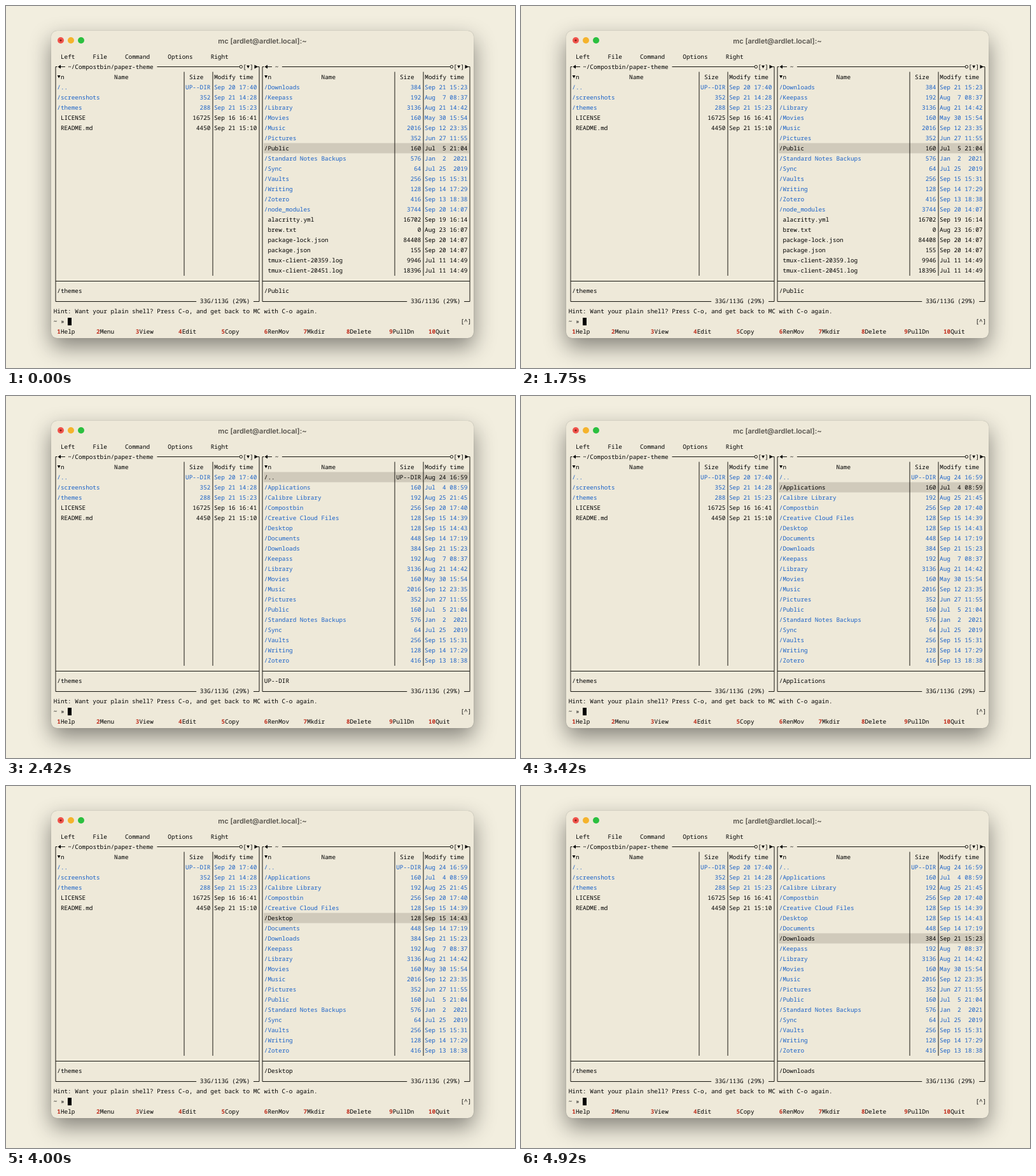
Animation of 800 by 569 pixels, one loop 5010 ms. Source, as an HTML page:

```html
<!DOCTYPE html>
<html lang="en">
<head>
<meta charset="utf-8">
<title>File manager</title>
<style>
html, body { margin: 0; width: 100%; height: 100%; overflow: hidden; background: #f2eedf; }
.window {
  position: absolute; left: 70.5px; top: 39px; width: 664.5px; height: 482.5px;
  border-radius: 9px; background: #eee9d9;
  box-shadow: 0 0 1px rgba(0,0,0,.35), 0 14px 34px rgba(0,0,0,.45);
}
svg { position: absolute; left: 0; top: 0; display: block; }
text { white-space: pre; text-rendering: geometricPrecision; }
.term { font: 9.353px "Noto Sans Mono", monospace; fill: #000; }
.term .dir { fill: #1a62c8; }
.term .key { fill: #c0301f; font-weight: 700; }
.title { font: 600 11px Inter, sans-serif; fill: #57544d; text-anchor: middle; }
.rules { fill: none; stroke: #16150f; }
</style>
</head>
<body>
<div class="window"></div>
<svg id="stage" width="800" height="569" viewBox="0 0 800 569">
  <circle cx="86" cy="54" r="5" fill="#f0544c"/>
  <circle cx="86" cy="54" r="1.6" fill="#8a1a12"/>
  <circle cx="102" cy="54" r="5" fill="#f5b32c"/>
  <circle cx="118" cy="54" r="5" fill="#2bc03f"/>
  <text class="title" x="403" y="58.5">mc [ardlet@ardlet.local]:~</text>
  <rect id="bar" x="405" width="323" height="16" fill="#d0cabb"/>
  <rect x="97" y="490" width="6" height="12"/>
  <g id="rules" class="rules"></g>
  <g id="marks"></g>
  <g id="term" class="term"></g>
</svg>
<script>
const LOOP = 5010, CELL = 5.612, LEFT = 74.7, LINE = 16, VISIBLE = 19, FIRST = 3;
const $ = id => document.getElementById(id);
const colX = col => LEFT + col * CELL;

function add(parent, tag, attrs, content = '') {
  const el = document.createElementNS('http://www.w3.org/2000/svg', tag);
  for (const key in attrs) el.setAttribute(key, attrs[key]);
  el.textContent = content;
  return parent.appendChild(el);
}

const put = (col, row, str = '', cls = '') =>
  add($('term'), 'text', { x: colX(col), y: 83 + row * LINE, class: cls }, str);

const parse = list => list.trim().split('\n').map(line => {
  const [name, size, date] = line.split('|');
  return { name, size, date, dir: name[0] === '/' };
});

const format = (f, width) =>
  (f.dir ? f.name : ' ' + f.name).padEnd(width) + ' ' + f.size.padStart(7) + ' ' + f.date;

const project = parse(`
/..|UP--DIR|Sep 20 17:40
/screenshots|352|Sep 21 14:28
/themes|288|Sep 21 15:23
LICENSE|16725|Sep 16 16:41
README.md|4450|Sep 21 15:10`);

const home = parse(`
/..|UP--DIR|Aug 24 16:59
/Applications|160|Jul  4 08:59
/Calibre Library|192|Aug 25 21:45
/Compostbin|256|Sep 20 17:40
/Creative Cloud Files|128|Sep 15 14:39
/Desktop|128|Sep 15 14:43
/Documents|448|Sep 14 17:19
/Downloads|384|Sep 21 15:23
/Keepass|192|Aug  7 08:37
/Library|3136|Aug 21 14:42
/Movies|160|May 30 15:54
/Music|2016|Sep 12 23:35
/Pictures|352|Jun 27 11:55
/Public|160|Jul  5 21:04
/Standard Notes Backups|576|Jan  2  2021
/Sync|64|Jul 25  2019
/Vaults|256|Sep 15 15:31
/Writing|128|Sep 14 17:29
/Zotero|416|Sep 13 18:38
/node_modules|3744|Sep 20 14:07
alacritty.yml|16702|Sep 19 16:14
brew.txt|0|Aug 23 16:07
package-lock.json|84408|Sep 20 14:07
package.json|155|Sep 20 14:07
tmux-client-20359.log|9946|Jul 11 14:49
tmux-client-20451.log|18396|Jul 11 14:49`);

// One panel frame: c0 and c1 are the border columns, d1 and d2 the dividers.
function panel(c0, c1, d1, d2, path) {
  const mid = col => Math.round(colX(col) + CELL / 2 + .3);
  const l = mid(c0), r = mid(c1), ring = colX(c1 - 5) + CELL / 2;
  const tri = (x, y) => `M${x - 2.4} ${y - 2}h4.8l-2.4 4.6z`;
  add($('rules'), 'path', { d:
    `M${l + 2.5} 95.5H${l}V464.5H${colX(c1 - 17)}` +
    `M${colX(c1 - 1)} 464.5H${r}V95.5h-3` +
    `M${l + 5} 95.5h10M${colX(c0 + 5 + path.length)} 95.5H${ring - 2.3}` +
    `M${l} 432.5H${r}M${mid(d1)} 103.5V424M${mid(d2)} 103.5V424` });
  add($('rules'), 'circle', { cx: ring, cy: 95.5, r: 2.2 });
  add($('marks'), 'path', { d:
    `M${l + 3.5} 95.5l4.5-3v6zM${r - 2} 95.5l-5.5-3v6z` +
    tri(colX(c1 - 3) + CELL / 2, 95.5) + tri(colX(c0 + 1) + CELL / 2, 111) });
  put(c0 + 4, 1, path);
  put(c1 - 4, 1, '[ ]');
  put(c0 + 2, 2, 'n');
  put(c0 + 17, 2, 'Name');
  put(d1 + 2, 2, 'Size');
  put(d2 + 1, 2, 'Modify time');
  put(c1 - 16, 24, '33G/113G (29%)');
}

panel(0, 57, 36, 44, '~/Compostbin/paper-theme');
panel(58, 116, 95, 103, '~');

for (const [col, label] of [[2, 'Left'], [11, 'File'], [20, 'Command'], [32, 'Options'], [44, 'Right']])
  put(col, 0, label);

const keyCols = [1, 12, 23, 35, 47, 59, 70, 82, 94, 105];
'Help Menu View Edit Copy RenMov Mkdir Delete PullDn Quit'.split(' ').forEach((label, i) => {
  const num = String(i + 1);
  put(keyCols[i], 27, num, 'key');
  put(keyCols[i] + num.length, 27, label);
});

project.forEach((f, i) => put(1, FIRST + i, format(f, 35), f.dir ? 'dir' : ''));
put(1, 23, '/themes');
put(0, 25, 'Hint: Want your plain shell? Press C-o, and get back to MC with C-o again.');
put(0, 26, '~ »');
put(114, 26, '[^]');

const rows = Array.from({ length: VISIBLE }, (_, i) => put(59, FIRST + i));
const status = put(59, 23);

// [time in ms, selected entry]
const moves = [
  [0, 13], [1830, 12], [1920, 10], [2000, 8], [2080, 6], [2170, 4], [2250, 2], [2330, 0],
  [3330, 1], [3500, 2], [3670, 3], [3830, 4], [4000, 5], [4170, 6], [4330, 7]
];
const SCROLL_AT = 2080;
let shown = -1;

function draw() {
  const t = performance.now() % LOOP;
  const selected = moves.findLast(([at]) => at <= t)[1];
  if (selected !== shown) {
    shown = selected;
    const top = t < SCROLL_AT ? home.length - VISIBLE : 0;
    rows.forEach((el, i) => {
      const f = home[top + i];
      el.textContent = format(f, 36);
      el.setAttribute('class', f.dir && top + i !== selected ? 'dir' : '');
    });
    $('bar').setAttribute('y', 119.5 + (selected - top) * LINE);
    status.textContent = selected ? home[selected].name : 'UP--DIR';
  }
  requestAnimationFrame(draw);
}
draw();
</script>
</body>
</html>
```
